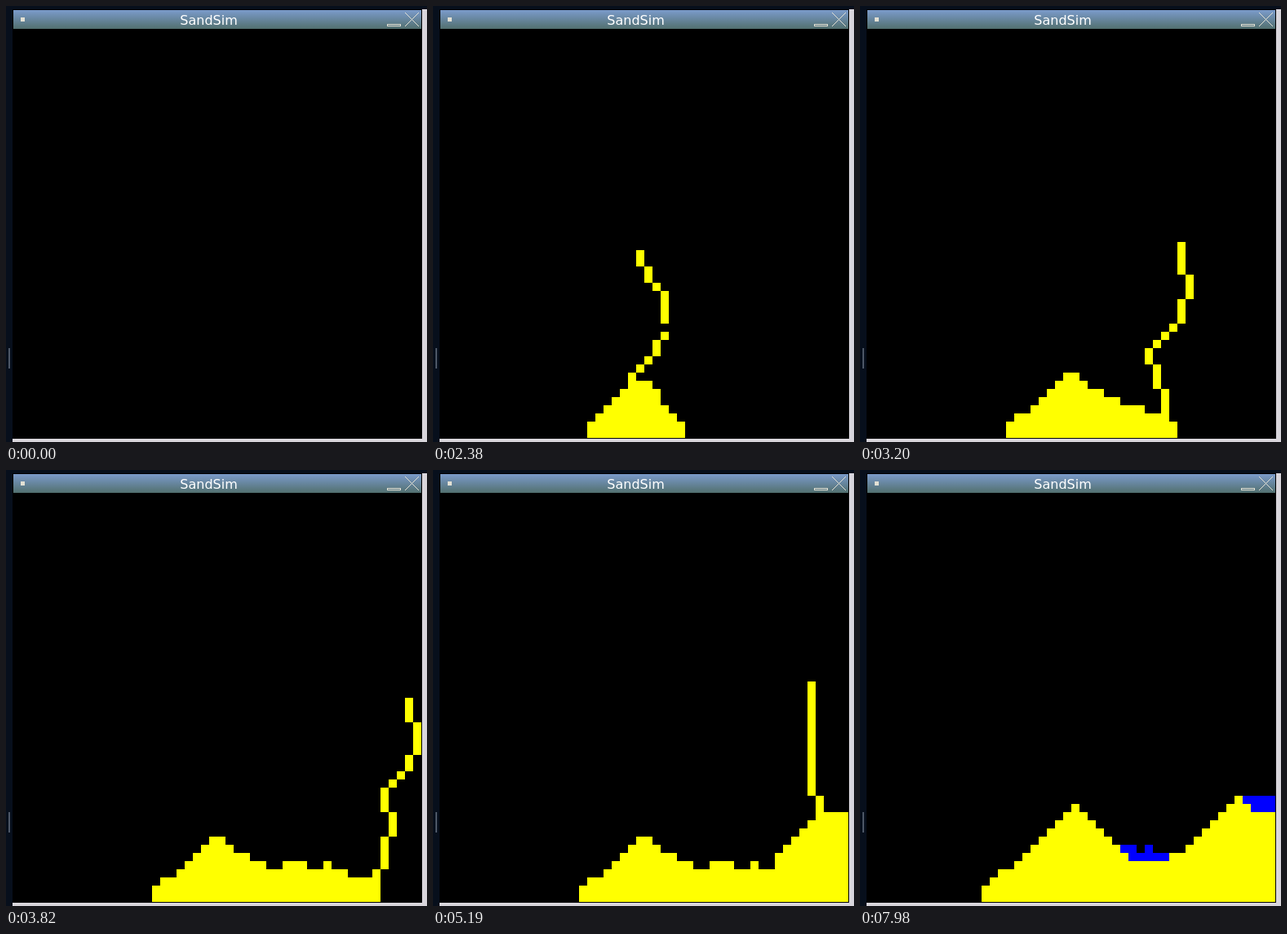
Recreate the animation shown at these times as an HTML page with a canvas. Size 516 by 534 pixels, loop 8000 ms.

```html
<!DOCTYPE html>
<html>
<head>
<meta charset="utf-8">
<title>SandSim</title>
<style>
html, body { margin: 0; width: 100%; height: 100%; overflow: hidden; background: #070f1c; }
canvas { display: block; }
</style>
</head>
<body>
<canvas id="stage" width="516" height="534"></canvas>
<script>
const ctx = document.getElementById('stage').getContext('2d');
const LOOP = 8000, CELL = 10, LEFT = 9, TOP = 29, SIZE = 50;
const EMPTY = 0, SAND = 1, WATER = 2;
const COLORS = { [SAND]: '#ffff00', [WATER]: '#0000ff' };

// Piecewise linear value through [x, y] points
function lerp(points, x) {
  if (x <= points[0][0]) return points[0][1];
  for (let i = 1; i < points.length; i++) {
    const [x0, y0] = points[i - 1], [x1, y1] = points[i];
    if (x <= x1) return y0 + (y1 - y0) * (x - x0) / (x1 - x0);
  }
  return points[points.length - 1][1];
}

const clock = [
  [1169, -1], [1170, 0.3], [2380, 70.3], [3200, 118.3], [3820, 152.3], [3920, 152.9],
  [5190, 219.3], [5720, 231], [6510, 277.3], [6610, 277.9], [6760, 292],
  [7200, 318.3], [8000, 365]
];

// Pointer position in cells, by tick
const pointerX = [
  [55, 24], [56, 23], [59, 26], [60, 26], [61, 27], [65, 27], [67, 25], [70, 24],
  [97, 36], [100, 36], [101, 35], [103, 35], [104, 34], [105, 34], [108, 37], [110, 38],
  [113, 39], [116, 38], [119, 38], [133, 45], [134, 45], [137, 46], [140, 45], [141, 45],
  [144, 48], [147.5, 49.4], [151, 48], [153, 48], [157, 49], [177, 49],
  [204, 46], [206, 45], [230, 45], [238, 25], [292, 25], [318, 48]
];
const pointerY = [[46, 28], [139, 25], [155, 25], [170, 22], [195, 23], [292, 23], [318, 21]];

function poured(tick) {
  if (tick <= 230 || (tick >= 238 && tick <= 291)) return SAND;
  if (tick >= 318 && tick <= 332) return WATER;
  return EMPTY;
}

let grid, tick;

function reset() {
  grid = Array.from({ length: SIZE }, () => new Array(SIZE).fill(EMPTY));
  tick = -1;
}

const isFree = (x, y) => x >= 0 && x < SIZE && y < SIZE && grid[y][x] === EMPTY;

// Next horizontal and vertical move of one cell, or null when it rests
function nextMove(x, y) {
  if (isFree(x, y + 1)) return [0, 1];
  const sides = [-1, 1];
  // The lowest layer only takes grains from straight above
  const slide = y < SIZE - 2 && sides.find(d => isFree(x + d, y + 1));
  if (slide) return [slide, 1];
  const spread = grid[y][x] === WATER && sides.find(d => isFree(x + d, y));
  return spread ? [spread, 0] : null;
}

function step() {
  tick++;
  for (let y = SIZE - 1; y >= 0; y--) {
    for (let x = 0; x < SIZE; x++) {
      const kind = grid[y][x];
      const move = kind && nextMove(x, y);
      if (!move) continue;
      const [dx, dy] = move;
      grid[y][x] = EMPTY;
      grid[y + dy][x + dx] = kind;
      // A cell spreading to the right must not move twice
      if (dx > 0 && dy === 0) x++;
    }
  }
  const kind = poured(tick);
  const x = Math.min(SIZE - 1, Math.round(lerp(pointerX, tick)));
  const y = Math.round(lerp(pointerY, tick));
  if (kind && isFree(x, y)) grid[y][x] = kind;
}

function seek(goal) {
  if (goal < tick) reset();
  while (tick < goal) step();
}

function box(color, x, y, w, h) {
  ctx.fillStyle = color;
  ctx.fillRect(x, y, w, h);
}

function drawWindow() {
  const pale = '#d9d6dc';
  box('#070f1c', 0, 0, 516, 534);
  box(pale, 510, 4, 6, 530);
  box(pale, 8, 530, 508, 4);
  box('#000', 8, 4, 502, 526);
  box('#4c5666', 3, 419, 2, 25);

  const bar = ctx.createLinearGradient(0, 5, 0, 28);
  bar.addColorStop(0, '#7b9bcb');
  bar.addColorStop(1, '#52706f');
  box(bar, 9, 5, 500, 23);

  const icon = '#e2e0d4';
  box(icon, 18, 14, 5, 5);
  ctx.strokeStyle = icon;
  ctx.lineWidth = 1;
  ctx.strokeRect(467.5, 22.5, 16, 2);
  ctx.beginPath();
  ctx.moveTo(489, 8);
  ctx.lineTo(506, 25);
  ctx.moveTo(506, 8);
  ctx.lineTo(489, 25);
  ctx.stroke();

  ctx.fillStyle = '#fff';
  ctx.font = '16px "DejaVu Sans", sans-serif';
  ctx.textAlign = 'center';
  ctx.fillText('SandSim', 248.5, 23);
}

function drawGrid() {
  grid.forEach((row, y) => row.forEach((kind, x) => {
    if (kind) box(COLORS[kind], LEFT + x * CELL, TOP + y * CELL, CELL, CELL);
  }));
}

function frame(now) {
  seek(Math.floor(lerp(clock, now % LOOP)));
  drawWindow();
  drawGrid();
  requestAnimationFrame(frame);
}

reset();
frame(performance.now());
</script>
</body>
</html>
```
